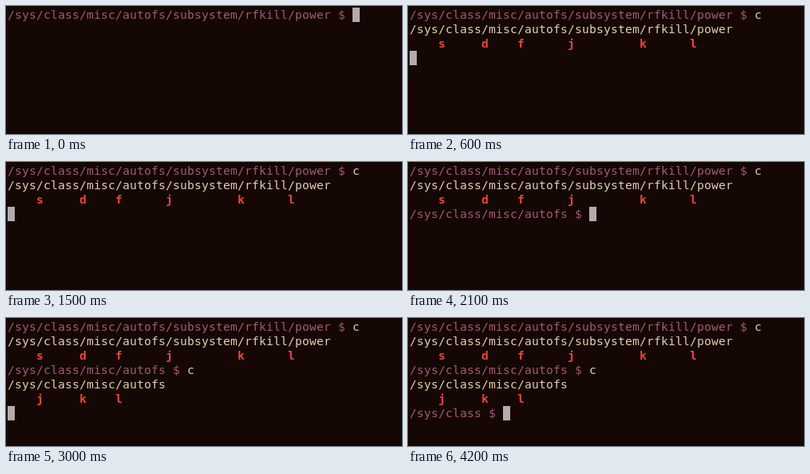
These frames come from a looping animation (496 px wide and 160 px high, 4.5 s). An HTML page:

```html
<!DOCTYPE html>
<html lang="en">
<head>
<meta charset="utf-8">
<title>Directory jump</title>
<style>
  html, body { margin: 0; width: 100%; height: 100%; overflow: hidden; background: #150703; }
  #term {
    position: relative; width: 496px; height: 160px; overflow: hidden;
    font: 11pt/18px "DejaVu Sans Mono", monospace;
  }
  #term span { position: absolute; white-space: pre; }
  .prompt { color: #a25a74; }
  .text { color: #dfd1b0; }
  .hint { color: #ee443b; font-weight: bold; }
  #cursor { width: 9px; height: 18px; background: #b3acae; }
</style>
</head>
<body>
<div id="term"></div>
<script>
const LOOP = 4500, CELL = 9, LINE = 18, PAD = 2;
const term = document.getElementById('term');
const deep = '/sys/class/misc/autofs/subsystem/rfkill/power';
const mid = '/sys/class/misc/autofs';
const base = '/sys/class';
const items = [];

function place(el, row, col) {
  el.style.left = PAD + col * CELL + 'px';
  el.style.top = PAD + row * LINE + 'px';
}

// Space the letters so that each one fills a whole terminal cell.
function fitCells() {
  const probe = document.createElement('span');
  probe.textContent = '0'.repeat(100);
  term.append(probe);
  const advance = probe.getBoundingClientRect().width / 100;
  probe.remove();
  term.style.letterSpacing = CELL - advance + 'px';
}

function put(from, row, col, kind, text) {
  const el = document.createElement('span');
  el.className = kind;
  el.textContent = text;
  place(el, row, col);
  term.append(el);
  items.push({ from, el });
}

// One hint key under each slash after the first.
function listPath(from, row, path, keys) {
  put(from, row, 0, 'text', path);
  let col = 0;
  for (const key of keys) {
    col = path.indexOf('/', col + 1);
    put(from, row + 1, col, 'hint', key);
  }
}

const prompt = (from, row, path) => put(from, row, 0, 'prompt', path + ' $ ');

fitCells();
prompt(0, 0, deep);
put(300, 0, deep.length + 3, 'text', 'c');
listPath(600, 1, deep, 'sdfjkl');
prompt(2100, 3, mid);
put(2700, 3, mid.length + 3, 'text', 'c');
listPath(3000, 4, mid, 'jkl');
prompt(3900, 6, base);

const cursor = document.createElement('span');
cursor.id = 'cursor';
term.append(cursor);

// [time, row, column]
const stops = [
  [0, 0, deep.length + 3],
  [300, 0, deep.length + 4],
  [600, 3, 0],
  [2100, 3, mid.length + 3],
  [2700, 3, mid.length + 4],
  [3000, 6, 0],
  [3900, 6, base.length + 3]
];

function draw() {
  const t = performance.now() % LOOP;
  for (const { from, el } of items) el.style.visibility = t >= from ? 'visible' : 'hidden';
  const [, row, col] = stops.filter(s => s[0] <= t).pop();
  place(cursor, row, col);
  requestAnimationFrame(draw);
}
draw();
</script>
</body>
</html>
```
